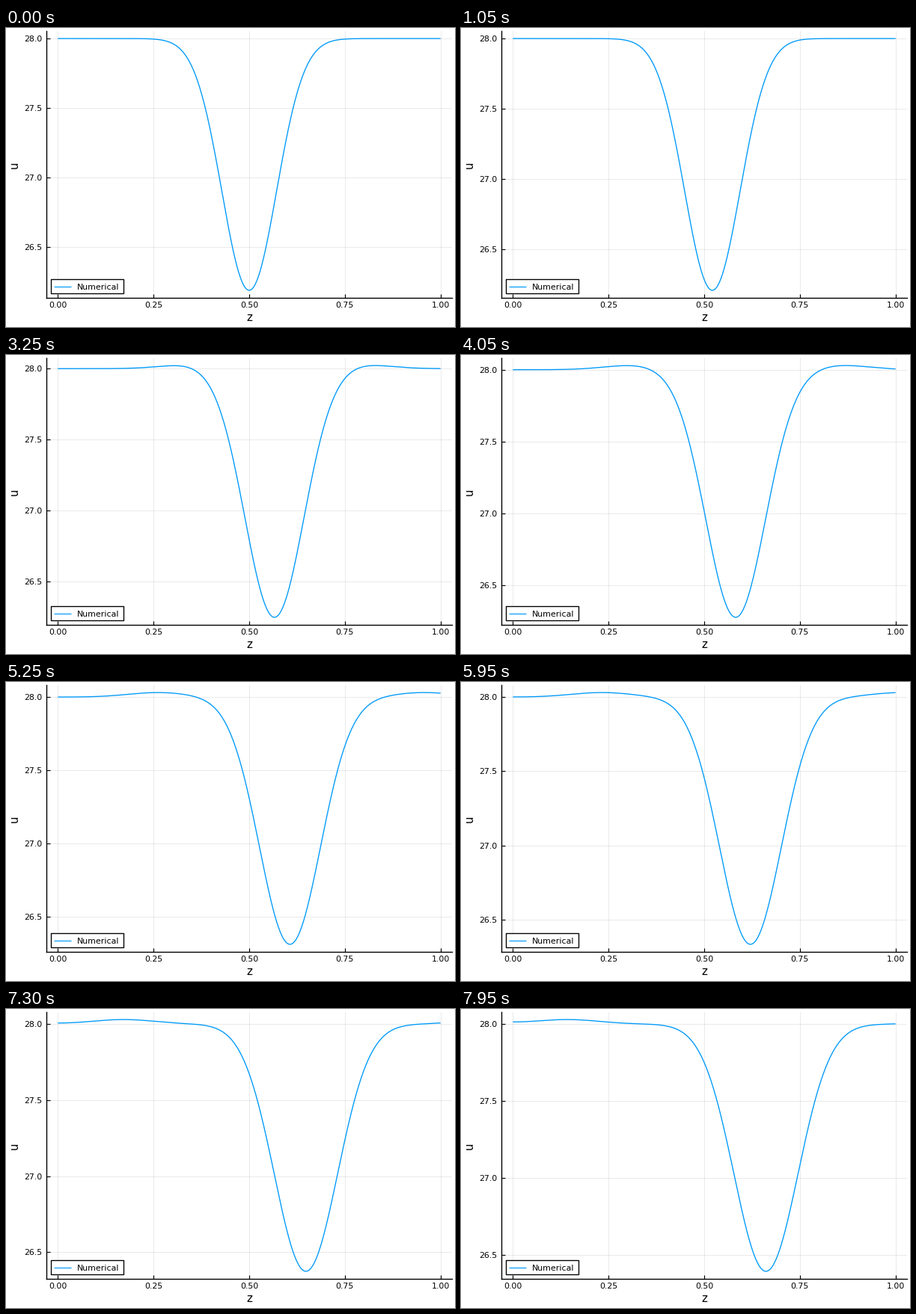
Recreate the animation shown at these times as a matplotlib script. Size 600 by 400 pixels, loop 8000 ms.

```python
import matplotlib.pyplot as plt
import numpy as np
from matplotlib.animation import FuncAnimation
from matplotlib.patches import Rectangle
from matplotlib.ticker import FormatStrFormatter, MultipleLocator

W, H = 600, 400
LEFT, RIGHT, TOP, BOTTOM = 54, 596, 4, 361
FRAMES, STEP = 160, 50
PX = 0.72  # points per pixel at 100 dpi
BLUE = "#009AF9"

plt.rcParams["font.family"] = "DejaVu Sans"
z = np.linspace(0, 1, 501)


def bell(center, width):
    return np.exp(-((z - center) ** 2) / (2 * width**2))


def profile(t):
    """A drifting, spreading dip that sheds one wave to each side."""
    spread = np.sqrt(1 + 0.0464 * t)
    width = 0.0715 * spread
    dip = 1.881 / spread * bell(0.5 + 0.0203 * t, width)
    left = 0.5 - 0.045 * t
    waves = bell(left, width) + bell(-left, width) + bell(0.5 + 0.087 * t, width)
    return 28 - dip + 0.0345 / spread * waves


fig = plt.figure(figsize=(W / 100, H / 100), dpi=100, facecolor="white")
ax = fig.add_axes([LEFT / W, 1 - BOTTOM / H, (RIGHT - LEFT) / W, (BOTTOM - TOP) / H])
ax.set_xlim(-0.03, 1.03)
ax.xaxis.set_major_locator(MultipleLocator(0.25))
ax.yaxis.set_major_locator(MultipleLocator(0.5))
ax.xaxis.set_major_formatter(FormatStrFormatter("%.2f"))
ax.yaxis.set_major_formatter(FormatStrFormatter("%.1f"))
ax.tick_params(direction="in", length=5 * PX, width=1.2 * PX, labelsize=11 * PX, pad=5.3 * PX)
ax.set_axisbelow(True)
ax.grid(color="black", alpha=0.1, linewidth=0.8 * PX)
ax.spines[["top", "right"]].set_visible(False)
ax.spines[["left", "bottom"]].set_linewidth(1.4 * PX)

fig.text(325.5 / W, 1 - 392.5 / H, "z", fontsize=15 * PX, ha="center", va="baseline")
fig.text(11.5 / W, 1 - 183 / H, "u", fontsize=15 * PX, rotation=90, ha="center", va="center")

(curve,) = ax.plot(z, profile(0), color=BLUE, linewidth=1.35 * PX, solid_capstyle="butt")

# Legend, laid out in pixels from the top left corner
key = fig.add_axes([0, 0, 1, 1], facecolor="none")
key.set_xlim(0, W)
key.set_ylim(H, 0)
key.axis("off")
key.add_patch(Rectangle((60, 336), 97, 19, facecolor="white", edgecolor="black",
                        linewidth=1.35 * PX, joinstyle="round"))
key.plot([64, 87], [345.5, 345.5], color=BLUE, linewidth=1.2 * PX, solid_capstyle="butt")
key.text(95, 349.5, "Numerical", fontsize=11 * PX, va="baseline")


def update(i):
    u = profile(i * STEP / 1000)
    low, high = u.min(), u.max()
    margin = 0.03 * (high - low)
    curve.set_ydata(u)
    ax.set_ylim(low - margin, high + margin)
    return (curve,)


anim = FuncAnimation(fig, update, frames=FRAMES, interval=STEP, repeat=True, repeat_delay=0)
plt.show()
```
